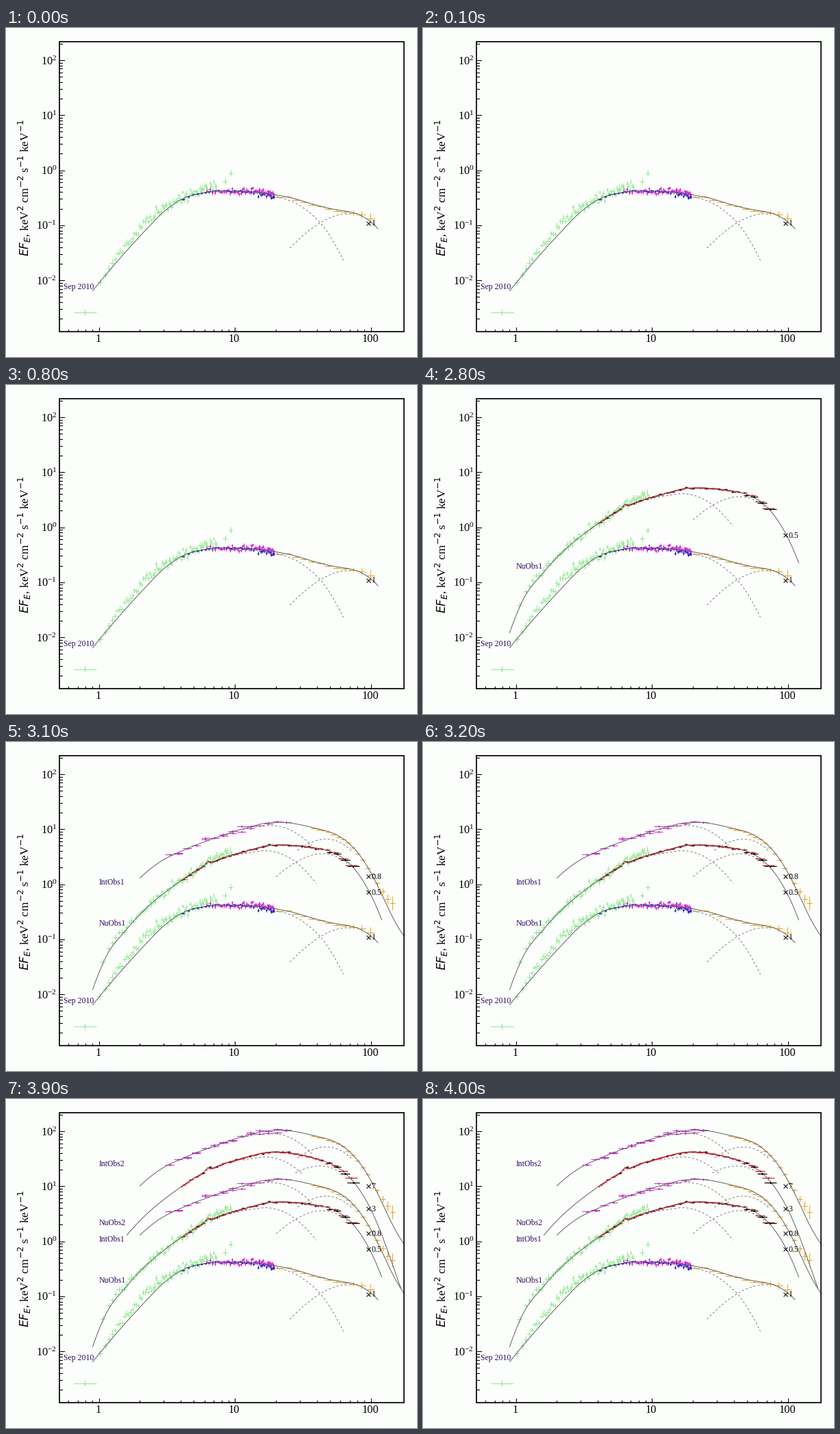
Recreate the animation shown at these times as a matplotlib script. Size 600 by 480 pixels, loop 8 s.

```python
import numpy as np
import matplotlib.pyplot as plt
from matplotlib.animation import FuncAnimation
from matplotlib.patches import Rectangle

plt.rcParams["font.family"] = "Liberation Serif"

W, H, DPI = 600, 480, 72
STEP_MS, LOOP_MS = 100, 8000
LEFT, RIGHT, TOP, BOTTOM = 77.5, 580.5, 19.5, 442.5
DECADE_X, DECADE_Y = 198.5, 80.3  # pixels per decade
PAPER, INK = "#fcfefc", "#330a5e"
GREEN, BLUE, PINK, GOLD = "#90e690", "#1c10c4", "#dc1ad2", "#e8a428"
MAUVE, BROWN, RED = "#cc2ccc", "#a82c30", "#c8202c"

rng = np.random.default_rng(7)
fig = plt.figure(figsize=(W / DPI, H / DPI), dpi=DPI, facecolor=PAPER)
ax = fig.add_axes([0, 0, 1, 1])
ax.set_xlim(-0.5, W - 0.5)
ax.set_ylim(H - 0.5, -0.5)
ax.axis("off")

stages = {}  # start time in ms -> artists that appear then


def px(energy):
    return 135 + DECADE_X * np.log10(energy)


def py(flux):
    return 207 - DECADE_Y * np.log10(flux)


def soft(*flat):
    """Hermite curve through a few key points, straight beyond its ends."""
    kx, ky = np.array(flat, float).reshape(-1, 2).T
    slope = np.gradient(ky, kx, edge_order=2)

    def curve(x):
        inside = np.clip(x, kx[0], kx[-1])
        i = np.clip(np.searchsorted(kx, inside) - 1, 0, len(kx) - 2)
        h = kx[i + 1] - kx[i]
        t = (inside - kx[i]) / h
        y = ((1 + 2 * t) * (1 - t) ** 2 * ky[i] + t * (1 - t) ** 2 * h * slope[i]
             + t * t * (3 - 2 * t) * ky[i + 1] + t * t * (t - 1) * h * slope[i + 1])
        return y + np.where(x > inside, slope[-1], slope[0]) * (x - inside)

    return curve


def hard(*flat):
    """Power law with an exponential cutoff, fitted to a few key points."""
    kx, ky = np.array(flat, float).reshape(-1, 2).T

    def basis(x):
        x = np.asarray(x, float) - 500
        return np.stack([np.ones_like(x), x, 10 ** (x / DECADE_X)], axis=-1)

    coef = np.linalg.lstsq(basis(kx), ky, rcond=None)[0]
    return lambda x: basis(x) @ coef


def shifted(curve, dy):
    return lambda x: curve(x) + dy


def total(low, high, bump=0):
    """Sum of both fluxes plus a narrow emission line."""
    def curve(x):
        flux = 10 ** (-low(x) / DECADE_Y) + 10 ** (-high(x) / DECADE_Y)
        return -DECADE_Y * np.log10(flux) - bump * np.exp(-((x - 294) / 4) ** 2)
    return curve


def add(start, *artists):
    stages.setdefault(start, []).extend(artists)


def line(start, curve, x0, x1, dashed=False):
    x = np.linspace(x0, x1, 300)
    style = (dict(color="#7c7c7c", lw=1, dashes=(3, 3)) if dashed
             else dict(color="#626262", lw=1))
    add(start, *ax.plot(x, curve(x), zorder=4, **style))


def model(start, low, high, span, low_span, high_span, bump=0):
    main = total(low, high, bump)
    line(start, main, *span)
    line(start, low, *low_span, dashed=True)
    line(start, high, *high_span, dashed=True)
    return main


def points(start, x, y, xerr, yerr, color, size=2.0, z=3.0, lw=1.0):
    bars = ax.errorbar(x, y, yerr=yerr, xerr=xerr, fmt="o", ms=size, mew=0,
                       color=color, elinewidth=lw, zorder=z)
    add(start, *bars.get_children())


def labels(start, name, x, y, factor, factor_y):
    add(start, ax.text(x, y, name, size=11.8, color=INK, zorder=6),
        ax.text(533, factor_y + 4, factor, size=11.8, zorder=6),
        *ax.plot(528.5, factor_y, "x", color="black", ms=6, mew=1, zorder=6))


def green_data(start, curve, x0, x1, n, lift, spread):
    u = np.linspace(0, 1, n)
    x = x0 + (x1 - x0) * u ** 0.7
    y = curve(x) - np.interp(u, (0, 0.08, 0.3, 0.5, 1), lift)
    y += rng.normal(0, spread, n) * np.minimum(1, 0.2 + 6 * u)
    points(start, x, y, 4 - 2.8 * u ** 0.5, rng.uniform(2.8, 5.2, n), GREEN, 1.8, 2)


def red_data(start, curve, color):
    """Short bars along the curve, then a few wide ones."""
    for c, x0, step, sd, z in (("black", 259, 9.6, 0.7, 4.1), (color, 256, 3.2, 0.4, 4.2)):
        x = np.arange(x0, 464, step)
        points(start, x, curve(x) + rng.normal(0, sd, len(x)), 1.9, 0.7, c, 2, z, 1.2)
        x = np.linspace(x0 + 212, x0 + 247, 4)
        points(start, x, curve(x) + rng.normal(0, 1, 4), np.linspace(4, 9, 4), 1,
               c, 2.6, z, 1.2)


def mauve_data(start, curve):
    """Two detectors; the second one misses some bins."""
    bins = 238 + 13.15 * np.arange(14)
    for x in (bins, bins[rng.random(14) < 0.6]):
        points(start, x, curve(x) + rng.normal(0, 1.9, len(x)), 6.5, 1.3, MAUVE, 2.6)


def gold_data(start, curve, x0, x1, n, width, height, lift):
    """Errors and lift above the curve grow towards the far end."""
    u = np.linspace(0, 1, n)
    x = x0 + (x1 - x0) * u
    y = curve(x) + 1 - lift * u ** 8 + rng.normal(0, 0.8, n)
    points(start, x, y, width, 1 + height * u ** 6, GOLD)


def faint_spectrum(start=0):
    low = soft(126, 383, 200, 298, 230, 267.5, 260, 247.5, 290, 239.5, 340, 238,
               390, 244, 435, 263, 465, 292, 492, 338.5)
    high = hard(414, 321, 460, 281.5, 505, 272, 542, 292)
    main = model(start, low, high, (126, 542.5), (335, 492), (414, 505))

    green_data(start, main, 136, 306, 74, (0, 10, 8, 2, 6), 4.5)
    points(start, [114.5, 319, 327], [414, 223, 211], [16.5, 3.5, 3], 4.5, GREEN)

    x = px(np.arange(4.15, 19.7, 0.38))
    late = x > 357
    y = main(x) + np.where(late, 2, 0) + rng.normal(0, 1, len(x)) * np.where(late, 3, 0.7)
    points(start, x, y, np.where(late, 0.8, 2.4), np.where(late, 2.8, 1), BLUE, 2.4)

    x = px(np.arange(6.25, 19.7, 0.3))
    y = main(x) - 0.5 + rng.normal(0, 2.4, len(x))
    points(start, x, y, 1.2, 2.6, PINK, 2.4)

    gold_data(start, main, 398, 531, 12, 6, 7, 6)
    labels(start, "Sep 2010", 83, 381, "1", 284)


def nu_spectra(first=2800, second=3700):
    low = soft(126, 361, 145, 314, 175, 273.5, 255, 202, 290, 180.5, 355, 161,
               385, 158.5, 415, 169.5, 452, 205.5)
    high = hard(394, 196, 450, 163.5, 500, 180, 525, 210, 548, 264.5)
    main = model(first, low, high, (126, 548), (325, 452), (394, 500), bump=3.5)
    green_data(first, main, 140, 328, 76, (4, 3, 1, 1, 6), 3.2)
    red_data(first, main, BROWN)
    labels(first, "NuObs1", 135, 267, "0.5", 218.5)

    high = hard(422, 108, 450, 97, 485, 104, 525, 152, 576, 306.5)
    main = model(second, shifted(low, -74), high, (176, 576), (345, 433), (422, 492),
                 bump=3.5)
    red_data(second, main, RED)
    labels(second, "NuObs2", 135, 183.5, "3", 159)


def int_spectra(first=3100, second=3700):
    low = soft(195, 198, 225, 174, 255, 159, 300, 141.5, 345, 127.5, 385, 121.2,
               415, 128, 446, 151)
    high = hard(425, 157, 463, 142, 505, 160, 540, 217, 581, 369)
    for start, dy, name, name_y, factor, factor_y in (
            (first, 0, "IntObs1", 207, "0.8", 195.5),
            (second, -71.8, "IntObs2", 97.5, "7", 126.5)):
        main = model(start, shifted(low, dy), shifted(high, dy),
                     (195, 581), (345, 446), (425, 505))
        mauve_data(start, main)
        gold_data(start, main, 448, 563.5, 17, 4, 9, 21)
        labels(start, name, 135, name_y, factor, factor_y)


def frame():
    ax.add_patch(Rectangle((LEFT, TOP), RIGHT - LEFT, BOTTOM - TOP, fill=False,
                           ec="black", lw=1.7, zorder=5))
    for decade in range(-3, 3):
        for k in range(1, 10):
            value = k * 10.0 ** decade
            x, y = px(value), py(value)
            size = 6.5 if k == 1 else 3.5
            if LEFT < x < RIGHT:
                ax.plot([x, x], [BOTTOM, BOTTOM - size], color="black", lw=1.1)
            if TOP < y < BOTTOM:
                ax.plot([LEFT, LEFT + size], [y, y], color="black", lw=1.1)
        if decade >= -2:
            ax.text(74, py(10.0 ** decade) + 6.6, r"$\mathdefault{10^{%d}}$" % decade,
                    size=16.4, ha="right", va="baseline")
    for value in (1, 10, 100):
        ax.text(px(value) - 0.8, 458, str(value), size=16.4, ha="center", va="baseline")
    ax.text(34, 232, r"$EF_E$, keV$^2$ cm$^{-2}$ s$^{-1}$ keV$^{-1}$", size=17.3,
            rotation=90, rotation_mode="anchor", ha="center", va="baseline")


def update(i):
    now = i * STEP_MS
    for start, artists in stages.items():
        for artist in artists:
            artist.set_visible(now >= start)
    return []


frame()
for draw in (faint_spectrum, nu_spectra, int_spectra):
    draw()

anim = FuncAnimation(fig, update, frames=LOOP_MS // STEP_MS, interval=STEP_MS,
                     repeat=True, repeat_delay=0, blit=False)
plt.show()
```
